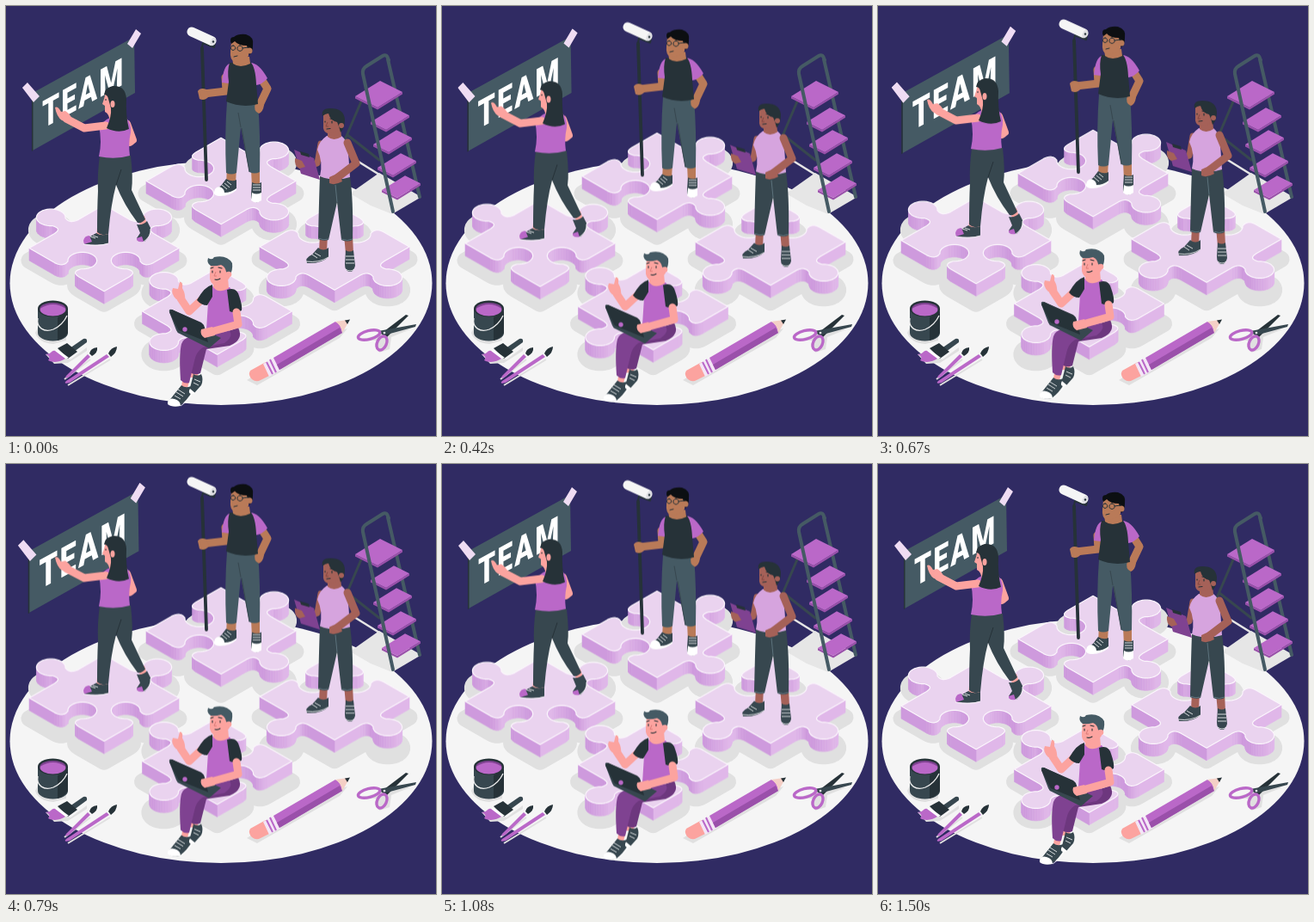
An HTML page that plays this animation: 500x500 px, repeating every 1.54 s.

```html
<!DOCTYPE html>
<html lang="en">
<head>
<meta charset="utf-8">
<title>Team</title>
<style>
html, body { margin: 0; width: 100%; height: 100%; overflow: hidden; background: #302b63; }
svg { display: block; width: 100%; height: 100%; }
.float { animation: float 1540ms -4ms steps(18) infinite; }
.pulse { transform-origin: 89px 98px; animation: pulse 1540ms linear infinite; }
@keyframes float {
  0%, 97.4%, 100% { transform: translateY(0); }
  48.7% { transform: translateY(-10px); }
}
@keyframes pulse {
  0%, 29.2%, 39%, 58.4%, 100% { transform: scale(1); }
  9.74%, 48.7% { transform: scale(1.1); }
}
.title { font: 900 45px Roboto, sans-serif; letter-spacing: 3px; fill: #fff; }
.ink { fill: #263238; }
.slate { fill: #37474f; }
.steel { fill: #455a64; }
.plum { fill: #ba68c8; }
.dark-plum { fill: #7f4291; }
.white { fill: #fff; }
.shade { fill: #e0e0e0; }
.rose { fill: #fca39f; }
.tan { fill: #b97a58; }
.brown { fill: #a56158; }
.limb { fill: none; stroke-linecap: round; stroke-linejoin: round; }
.limb.rose { stroke: #fca39f; fill: none; }
.limb.tan { stroke: #b97a58; fill: none; }
.limb.brown { stroke: #a56158; fill: none; }
.line { fill: none; stroke: #263238; stroke-linecap: round; stroke-linejoin: round; }
.lace { fill: none; stroke: #fff; stroke-width: .8; }
.rail { fill: none; stroke: #455a64; stroke-width: 4; stroke-linecap: round; stroke-linejoin: round; }
</style>
</head>
<body>
<svg viewBox="0 0 500 500" preserveAspectRatio="none">
  <rect width="500" height="500" fill="#302b63"/>
  <ellipse cx="250" cy="322.3" rx="245.5" ry="141.7" fill="#f5f5f5"/>
  <path d="M400 218L434 194L483 222L449 242L424 232Z" fill="#e6e6e6"/>
  <g id="shadows" fill="#e0e0e0" stroke="#e0e0e0" stroke-width="19" stroke-linejoin="round"></g>

  <g id="ladder">
    <path class="line" d="M419 97L390 165M397 150L434 179" stroke-width="3" style="stroke:#37474f"/>
    <path d="M405 178L434 196" stroke="#e6e6e6" stroke-width="2.5"/>
    <path class="rail" d="M444 62L481 222"/>
    <g id="steps"></g>
    <path class="rail" d="M450 239L415 79Q414 73 419 70L438 58Q443 55 445 63"/>
  </g>

  <g class="pulse">
    <path class="steel" d="M31 101L149 36L150 101L31 168Z"/>
    <path class="ink" d="M30 100L31.5 101V168L30 169Z"/>
    <text class="title" transform="matrix(.71 -.39 0 1 42 143)">TEAM</text>
    <path d="M19 95L25 89L39 105L32 112ZM151 27L157 32L147 49L141 44Z" fill="#efdcf3"/>
  </g>

  <g id="can">
    <path class="shade" d="M34 380Q38 392 55 393L70 389V372H38Z"/>
    <path class="slate" d="M37 352V380A17.500 9.500 0 0 0 72 380V352Z"/>
    <path class="ink" d="M60 362L72 355V380Q69 386 60 389Z"/>
    <ellipse class="ink" cx="54.5" cy="352" rx="17.5" ry="9.5"/>
    <ellipse class="plum" cx="54.5" cy="353" rx="15" ry="7.4"/>
    <path d="M39.500 352A15 7 0 0 1 69.500 352Q55 342 39.500 352Z" class="dark-plum"/>
    <path d="M37 363C35 374 44 380 55 376Q66 371 71 360" fill="none" stroke="#eee" stroke-width="1.3"/>
  </g>

  <g id="brushes">
    <path d="M68 434L98 411M72 441L121 411" stroke="#e0e0e0" stroke-width="2"/>
    <path class="shade" d="M46 405L54 404L75 411L94 397V401L72 415L56 416Z"/>
    <path class="slate" d="M74 398L90 387Q95 386 94 391L79 402Z"/>
    <path class="ink" d="M60 398L71 392L83 402L72 410Z"/>
    <path d="M61 400L57 401L69 410L73 409Z" fill="#fff"/>
    <path class="plum" d="M57 401C52 400 54 405 46 405Q53 408 49 412C57 416 64 413 69 410Z"/>
    <path class="plum" d="M70 430Q67 435 74 431L98 408L95 405Z"/>
    <path class="plum" d="M70 436Q66 440 74 438L120 408L117 405Z"/>
    <path class="ink" d="M97 404Q98 398 106 397Q107 403 100 407ZM119 404Q122 397 129 396Q129 403 122 408Z"/>
  </g>

  <g id="pencil">
    <path class="shade" d="M280 435L292 441L388 386L397 375L360 386Z"/>
    <path class="rose" d="M284 424Q281 429 286 434Q291 438 296 435L310 428L302 414Z"/>
    <path d="M299 416L312 409L320 423L306 431Z" fill="#f3e6f6"/>
    <path d="M303 414L310 428M307 411L314 426" stroke="#ba68c8" stroke-width="2"/>
    <path class="plum" d="M311 409L383 367Q390 370 391 380L318 423Z"/>
    <path d="M315 417L388 374L391 380L318 423Z" fill="#9a50aa"/>
    <path d="M383 367L397 365L398 368L391 380Q390 371 383 367Z" fill="#f4cfc6"/>
    <path class="ink" d="M394 365.500L400 364.500L397 370Z"/>
  </g>

  <g id="scissors">
    <path class="shade" d="M410 389L431 389L434 403L446 399L448 385L470 376L450 377Z"/>
    <path class="ink" d="M436 381L465 359L468 360L443 385Z"/>
    <path class="slate" d="M433 378L477 370L476 373L439 383Z"/>
    <g fill="none" stroke="#ba68c8" stroke-width="3.400">
      <ellipse cx="422" cy="382.500" rx="13" ry="5" transform="rotate(-14 422 382)"/>
      <ellipse cx="437" cy="392" rx="5.400" ry="8.500" transform="rotate(25 437 392)"/>
    </g>
    <circle cx="440" cy="380" r="1.300" fill="#fff"/>
  </g>

  <g class="float">
    <g id="back"></g>
    <g id="painter">
      <path class="line" d="M243 43L242 48L229 43L228 48" stroke-width="2"/>
      <path class="line" d="M228 49L233 202" stroke-width="3.800"/>
      <path d="M216 30L239 40.500" stroke="#f5f5f5" stroke-width="11" stroke-linecap="round"/>
      <ellipse cx="241" cy="41.500" rx="2.800" ry="5.200" fill="#dedee2" transform="rotate(26 241 41)"/>
      <circle class="ink" cx="241" cy="41.500" r="1.200"/>
      <path class="tan" d="M257 188H268L267 207H256ZM285 190H295V211H286Z"/>
      <path class="steel" d="M257 111L293 113Q296 150 295 193Q289 196 283 193L273 141L268 194Q262 197 256 194Q254 150 257 111Z"/>
      <path d="M273 141L270 124M274 142L283 193" fill="none" stroke="#37474f"/>
      <path class="slate" d="M256 201Q263 205 268 202V213Q262 218 252 220L243 218Q243 212 250 209ZM286 205Q292 208 297 205V223Q296 229 290 228Q284 227 285 219Z"/>
      <path class="white" d="M242 217Q242 211 248 210Q254 212 254 217Q262 217 268 212V214Q260 221 249 221Q242 221 242 217ZM286 217Q291 220 297 217L297 226Q291 231 285 226Z"/>
      <path class="lace" d="M251 208L257 213M254 206L260 211M257 204L262 208M287 208H296M287 211H296M287 214H296"/>
      <path class="limb tan" d="M255 83L256 99L230 102" stroke-width="9"/>
      <path class="tan" d="M223 99Q226 94 233 97L236 105Q231 111 225 108Z"/>
      <path class="limb tan" d="M297 85L304 96L295 115" stroke-width="9"/>
      <path class="tan" d="M290 113L300 115Q299 123 294 125Q287 122 290 113Z"/>
      <path class="plum" d="M260 67Q253 69 251 89L259 90ZM284 66Q294 66 304 84Q298 91 291 92L282 78Z"/>
      <path class="ink" d="M260 66L284 65Q290 70 291 91L293 114Q274 119 256 111L259 88Q257 75 260 66Z"/>
      <path class="tan" d="M263 59H283L284 67Q272 73 264 67Z"/>
      <path class="tan" d="M262 42Q268 38 282 43V58Q277 65 266 65Q260 63 261 52Z"/>
      <path fill="#0c0f12" d="M262 44Q259 36 265 36Q270 32 279 33Q289 36 287 46Q287 54 283 57L280 46Q270 46 266 41Z"/>
      <circle class="tan" cx="283" cy="52" r="3.500"/>
      <path class="line" d="M264 46a2.700 2.700 0 1 0 .1 0ZM272 46a3.200 3.200 0 1 0 .1 0ZM275 49L282 48M265 59L269 58" stroke-width="1"/>
    </g>

    <g id="left"></g>
    <g id="presenter">
      <path class="limb rose" d="M141 137L148 156L142 159" stroke-width="8"/>
      <path class="rose" d="M143 154L151 155Q149 165 139 163L137 158Z"/>
      <path class="rose" d="M106 258H118V269H105ZM153 247L161 244L165 257L158 260Z"/>
      <path class="slate" d="M109 174L145 174Q148 200 146 214L162 248Q158 253 153 252Q137 231 128 208Q122 230 119 265Q111 268 106 263Q106 235 107 215Q106 195 109 174Z"/>
      <path d="M128 208L134 190" stroke="#263238"/>
      <path class="slate" d="M105 264Q111 268 119 265V276Q108 279 91 277Q90 270 98 268ZM152 254Q160 255 164 250L168 258Q169 267 161 274Q151 274 152 270L156 264Z"/>
      <path class="plum" d="M90 273Q91 267 97 267L100 274L91 277ZM152 270L158 268L160 274Q151 275 152 270Z"/>
      <path class="lace" d="M98 268L104 270M101 267L107 269M90 277Q108 280 119 276M160 274Q169 268 168 259"/>
      <path class="plum" d="M117 132Q128 125 140 130Q146 137 145 147Q142 160 144 174Q127 179 108 175Q112 158 108 139Z"/>
      <path class="limb rose" d="M116 139L91 142L70 131" stroke-width="9"/>
      <path class="rose" d="M74 135L65 133Q59 129 57 118Q60 116 64 123L69 122Q74 125 76 130Z"/>
      <path class="rose" d="M116 100L114 108L112 114L115 116L115 123Q120 125 121 135L131 132L129 103Z"/>
      <path class="ink" d="M114 103Q115 95 124 93Q139 92 140 108Q139 127 143 143Q131 149 117 142Q123 128 122 119L119 108Q118 103 114 103Z"/>
      <ellipse class="rose" cx="124" cy="114" rx="2.500" ry="4"/>
      <path d="M116 108V110" stroke="#263238"/>
    </g>

    <g id="right"></g>
    <g id="planner">
      <path class="brown" d="M365 265H374L373 286H364ZM393 266H403L404 288H395Z"/>
      <path class="slate" d="M365 198L400 198Q404 225 403 272Q397 275 390 272L385 228L375 272Q369 274 363 271Q364 224 365 198Z"/>
      <path d="M385 228L383 208M363 270Q369 273 375 271M390 271Q397 274 403 271" fill="none" stroke="#5d737d"/>
      <path class="slate" d="M363 281Q369 286 375 281V292Q366 300 350 299Q347 293 356 289ZM395 284Q400 287 404 284L406 302Q404 310 399 309Q394 308 394 300Z"/>
      <path class="lace" d="M356 289L362 293M359 287L366 291M349 297Q364 299 375 292M395 291H405M395 295H405M395 299H405M395 306Q400 310 405 306"/>
      <path class="limb brown" d="M366 160L362 183L350 187" stroke-width="7"/>
      <path class="dark-plum" d="M335 167L358 177L365 202L343 195Z"/>
      <path class="ink" d="M342 169L352 172L353 176L343 173Z"/>
      <path class="brown" d="M336 177L344 180L348 187L341 189Q335 186 336 177Z"/>
      <path fill="#d6a4de" d="M373 151L389 150Q398 157 398 170L400 199Q382 205 365 198Q369 181 362 167Q364 157 373 151Z"/>
      <path class="limb brown" d="M397 159L407 183L386 199" stroke-width="9"/>
      <path class="brown" d="M376 199L387 194L391 204Q382 209 376 206Z"/>
      <path class="brown" d="M374 140H389L390 152Q381 158 374 152Z"/>
      <path class="brown" d="M369 127Q378 120 389 128L390 142Q383 148 374 148Q368 146 369 138Z"/>
      <path class="ink" d="M368 128Q366 119 377 119Q393 119 394 132Q394 142 389 147Q387 139 385 135Q377 133 375 125Q371 125 368 128Z"/>
      <circle class="brown" cx="390" cy="139" r="3"/>
      <path class="line" d="M371 134V135M379 134V136M373 143L377 142.500M377 131L381 132" stroke-width="1.200"/>
      <path d="M374 135L372 140L375 140" fill="none" stroke="#7e423d" stroke-width=".8"/>
    </g>

    <g id="front"></g>
    <g id="coder">
      <path class="rose" d="M216 422L225 424L222 432L214 432ZM206 431L214 433L211 444L204 442Z"/>
      <path fill="#6d377e" d="M238 385L270 374Q277 388 260 395L233 399L226 427Q220 430 214 426L218 400Z"/>
      <path class="dark-plum" d="M213 385L254 374Q269 381 254 392L229 397Q221 402 219 413L213 438Q208 440 203 435Q201 405 204 393Q206 387 213 385Z"/>
      <path class="slate" d="M218 428Q223 431 227 428Q230 434 227 441L219 450Q213 450 214 444ZM204 441Q209 445 215 442L216 449Q211 458 202 465Q191 467 188 461Z"/>
      <path class="white" d="M188 460Q191 455 196 457Q203 459 203 465Q193 467 188 463ZM214 445L220 450Q212 453 213 447Z"/>
      <path class="lace" d="M198 449L206 454M200 446L208 451M196 453L203 457M203 465Q214 458 217 449M219 434L226 437M218 438L224 441"/>
      <path class="plum" d="M240 326L260 327Q270 337 267 373Q250 385 233 376L235 345Q231 335 240 326Z"/>
      <path class="limb rose" d="M228 341L213 355L203 340" stroke-width="9"/>
      <path class="rose" d="M208 342L198 341Q191 334 194 328L200 329L202 321Q206 320 205 328Q209 335 208 342Z"/>
      <path class="ink" d="M240 324Q231 326 222 342Q227 348 234 348L240 338ZM257 330Q268 326 271 337Q275 348 274 354Q267 358 260 355Z"/>
      <path class="rose" d="M241 316H258L259 328Q247 335 241 327Z"/>
      <path class="slate" d="M193 353Q189 352 190 356L198 377Q199 380 202 381L236 398L250 386L231 377L229 370Z"/>
      <path class="ink" d="M193 353L227 368Q230 370 231 374L235 391L203 378Q200 377 199 374L190 356Z"/>
      <circle class="plum" cx="208" cy="376" r="2.700"/>
      <path class="limb rose" d="M268 356L270 370L238 379" stroke-width="9"/>
      <path class="rose" d="M227 376L240 373L243 383L231 386Q225 382 227 376Z"/>
      <path class="rose" d="M238 300Q248 294 260 301L260 316Q254 325 243 325Q236 322 237 312Z"/>
      <path class="steel" d="M238 302Q233 299 235 293Q240 296 242 292Q257 289 263 299Q264 307 260 314L256 309Q255 303 250 301Q243 303 238 302Z"/>
      <circle class="rose" cx="259" cy="312" r="3.300"/>
      <path class="line" d="M240 308V310M249 308V310M243 318Q246 319 249 317M238 305L241 304M247 304L251 305" stroke-width="1.100"/>
      <path d="M244 309L242 314L245 314" fill="none" stroke="#d87874" stroke-width=".9"/>
    </g>
  </g>
</svg>
<script>
const W = 87, H = W / Math.sqrt(3), DEPTH = 14.5;
const byId = id => document.getElementById(id);

function path(parent, d, attrs = {}) {
  const el = document.createElementNS('http://www.w3.org/2000/svg', 'path');
  for (const [key, value] of Object.entries({ d, ...attrs })) el.setAttribute(key, value);
  parent.append(el);
}

const polygon = pts => 'M' + pts.map(p => p.map(v => v.toFixed(2)).join(' ')).join('L') + 'Z';

// One edge as [along, outward] points: sign 1 is a tab, -1 a notch.
function edge(sign) {
  const r = 0.137, mid = 0.21, open = 0.87, neck = [];
  const end = [0.5 - r * Math.cos(open), mid - r * Math.sin(open)];
  for (let i = 0; i < 6; i++) {
    const t = i / 6, u = 1 - t;
    neck.push([u * u * 0.34 + 2 * u * t * 0.45 + t * t * end[0], 2 * u * t * 0.005 + t * t * end[1]]);
  }
  const arc = [];
  for (let i = 0; i <= 28; i++) {
    const a = Math.PI + open - i / 28 * (Math.PI + 2 * open);
    arc.push([0.5 + r * Math.cos(a), mid + r * Math.sin(a)]);
  }
  const back = neck.map(([s, h]) => [1 - s, h]).reverse();
  return [[0, 0], ...neck, ...arc, ...back].map(([s, h]) => [s, h * sign]);
}

// Corners run left, top, right, bottom.
function outline(cx, cy, signs) {
  const corners = [[-0.5, -0.5], [0.5, -0.5], [0.5, 0.5], [-0.5, 0.5]];
  return signs.flatMap((sign, i) => {
    const [ax, ay] = corners[i], [bx, by] = corners[(i + 1) % 4];
    const dx = bx - ax, dy = by - ay;
    return edge(sign).map(([s, h]) => {
      const x = ax + dx * s + dy * h, y = ay + dy * s - dx * h;
      return [cx + (x + y) * W, cy + (y - x) * H];
    });
  });
}

function sideColor(dx, dy) {
  const t = Math.min(1, Math.max(0, 0.5 + dy / Math.hypot(dx, dy)));
  const mix = (a, b) => Math.round(a + (b - a) * t);
  return `rgb(${mix(206, 224)},${mix(154, 183)},${mix(221, 233)})`;
}

function piece(id, cx, cy, signs) {
  const pts = outline(cx, cy, signs), group = byId(id);
  const lower = ([x, y]) => [x, y + DEPTH];
  path(byId('shadows'), polygon(pts.map(lower)));
  pts.map((p, i) => [p, pts[(i + 1) % pts.length]])
    .filter(([p, q]) => q[0] < p[0])
    .sort((a, b) => a[0][1] + a[1][1] - b[0][1] - b[1][1])
    .forEach(([p, q]) => {
      const color = sideColor(q[0] - p[0], q[1] - p[1]);
      path(group, polygon([p, q, lower(q), lower(p)]), { fill: color, stroke: color, 'stroke-width': 0.6 });
    });
  path(group, polygon(pts), { fill: '#ead3ef', stroke: '#fbf5fc', 'stroke-width': 1.2, 'stroke-linejoin': 'round' });
}

piece('back', 250, 203.5, [-1, 1, 1, -1]);
piece('left', 114, 281.5, [1, 1, -1, -1]);
piece('right', 382, 280, [-1, -1, 1, 1]);
piece('front', 245.5, 355, [1, -1, -1, 1]);

function step(x, y, w, d) {
  const a = [x, y], b = [x + w, y - w * 0.62], c = [x + w + d, y - w * 0.62 + d * 0.5], e = [x + d, y + d * 0.5];
  const drop = ([px, py]) => [px, py + 2.5];
  path(byId('steps'), polygon([a, e, c, drop(c), drop(e), drop(a)]), { fill: '#9a50aa' });
  path(byId('steps'), polygon([a, b, c, e]), { fill: '#ba68c8' });
}

step(406, 105, 29, 26);
[[424, 135], [427, 161], [432, 188], [437, 214]].forEach(([x, y]) => step(x, y, 27, 18));
</script>
</body>
</html>
```
